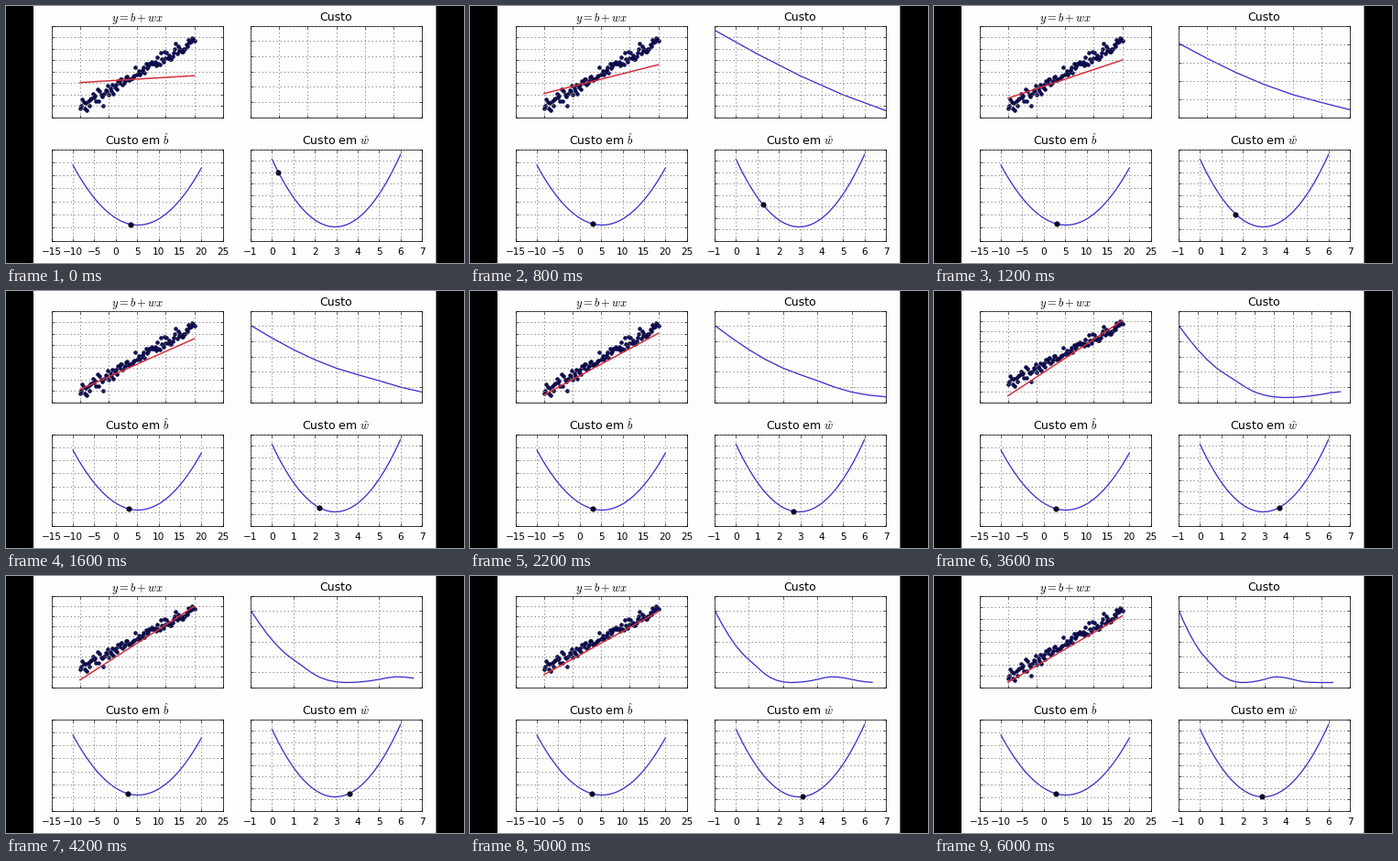
A matplotlib script that plays this animation: 500 by 281 pixels, repeating every 6200 ms.

```python
import numpy as np
import matplotlib.pyplot as plt
from matplotlib.animation import FuncAnimation
from matplotlib.patches import Rectangle

W, H, DPI = 500, 281, 100
PT = 72 / DPI  # points per pixel
FRAMES, INTERVAL = 31, 200
LEFT, RIGHT, TOP, BOTTOM = 49.7, 267, 21.5, 156.5

BLUE, RED, NAVY, PAPER = "#3a30cc", "#d62c3a", "#0c0c5c", "#fefdfe"

plt.style.use("classic")
plt.rcParams.update({
    "font.family": "DejaVu Sans",
    "axes.autolimit_mode": "round_numbers",
    "axes.xmargin": 0,
    "axes.ymargin": 0,
    "axes.facecolor": PAPER,
    "savefig.facecolor": PAPER,
})


def spline(x, points):
    """Cubic Hermite curve through a few (x, y) points."""
    xs, ys = np.array(points, float).T
    slope = np.gradient(ys, xs)
    i = np.clip(np.searchsorted(xs, x, "right") - 1, 0, len(xs) - 2)
    h = xs[i + 1] - xs[i]
    t = (x - xs[i]) / h
    return ((1 + 2 * t) * (1 - t) ** 2 * ys[i] + t * (1 - t) ** 2 * h * slope[i]
            + t * t * (3 - 2 * t) * ys[i + 1] + t * t * (t - 1) * h * slope[i + 1])


# Descent with momentum: w overshoots its optimum and swings back.
steps = np.arange(28)
w_path = spline(steps, [(0, .3), (4, 1.26), (6, 1.67), (8, 2.22), (11.3, 2.95),
                        (14, 3.36), (17, 3.7), (19, 3.61), (23, 3.1), (27, 2.9)])
b_path = spline(steps, [(0, 3.4), (4, 3.05), (8, 3), (14, 2.86), (27, 2.73)])
cost = 1.5 + 3.376 * (w_path - 2.95) ** 2


def cost_b(b):
    return 59.5 + .995 * (b - 5.18) ** 2


def cost_w(w):
    return 6 + 3.4 * (w - 2.95) ** 2


fig = plt.figure(figsize=(W / DPI, H / DPI), dpi=DPI, facecolor=PAPER)
for left, right in ((0, 30), (469.5, W)):
    fig.add_artist(Rectangle((left / W, 0), (right - left) / W, 1,
                             fc="black", lw=0, zorder=-1, snap=False))


def panel(left, top, title, labels=False):
    ax = fig.add_axes([left / W, 1 - (top + 100) / H, 187 / W, 100 / H])
    ax.set_title(title, fontsize=12.5 * PT, pad=(4 if labels else 5) * PT)
    ax.grid(True, color="#707070", lw=.7 * PT, ls=(0, (1.5 * PT, 2.5 * PT)))
    ax.tick_params(length=3 * PT, width=.6 * PT, pad=7 * PT, labelsize=10.5 * PT,
                   labelleft=False, labelbottom=labels)
    for spine in ax.spines.values():
        spine.set(linewidth=PT, color="#383838")
    return ax


def cost_panel(left, title, f, span, xticks, yticks):
    ax = panel(left, BOTTOM, title, labels=True)
    x = np.linspace(*span, 50)
    ax.plot(x, f(x), color=BLUE, lw=1.3 * PT)
    dot, = ax.plot([], [], "o", ms=5.4 * PT, color="#08082c", mew=.6 * PT)
    ax.set_xticks(xticks)
    ax.set_yticks(yticks)
    ax.set_xlim(xticks[0], xticks[-1])
    ax.set_ylim(yticks[0], yticks[-1])
    return dot


fit = panel(LEFT, TOP, "$y=b+wx$")
history = panel(RIGHT, TOP, "Custo")
dot_b = cost_panel(LEFT, r"Custo em $\hat{b}$", cost_b, (-10, 20),
                   range(-15, 26, 5), range(0, 351, 50))
dot_w = cost_panel(RIGHT, r"Custo em $\hat{w}$", cost_w, (0, 6),
                   range(-1, 8), range(0, 41, 5))

rng = np.random.default_rng(4)
x = np.linspace(-2, 2, 100)
noise = rng.normal(0, .55, x.size)
noise[[6, 20]] = -1.5, -2.2
fit.plot(x, 3.7 + 2.88 * x + noise, "o", ms=3.8 * PT, color=NAVY, mec="#080830", mew=.6 * PT)
model, = fit.plot([], [], color=RED, lw=1.5 * PT)
fit.set_xticks(range(-3, 4))
fit.set_xlim(-3, 3)
curve, = history.plot([], [], color=BLUE, lw=1.3 * PT)

ends = np.array([-2, 2])


def draw(frame):
    n = int(.9 * frame + .8 + 1e-9)
    w, b = w_path[n], b_path[n]

    line = 2.65 + w * ends
    model.set_data(ends, line)
    low = -6 if line[0] < -3.4 else -4
    fit.set_yticks(range(low, 13, 2))
    fit.set_ylim(low, 12)

    curve.set_data(steps[:n + 1], cost[:n + 1])
    history.relim()
    history.autoscale_view()

    dot_b.set_data([b], [cost_b(b)])
    dot_w.set_data([w], [cost_w(w)])
    return model, curve, dot_b, dot_w


anim = FuncAnimation(fig, draw, frames=FRAMES, interval=INTERVAL,
                     repeat=True, repeat_delay=0, blit=False)
plt.show()
```
